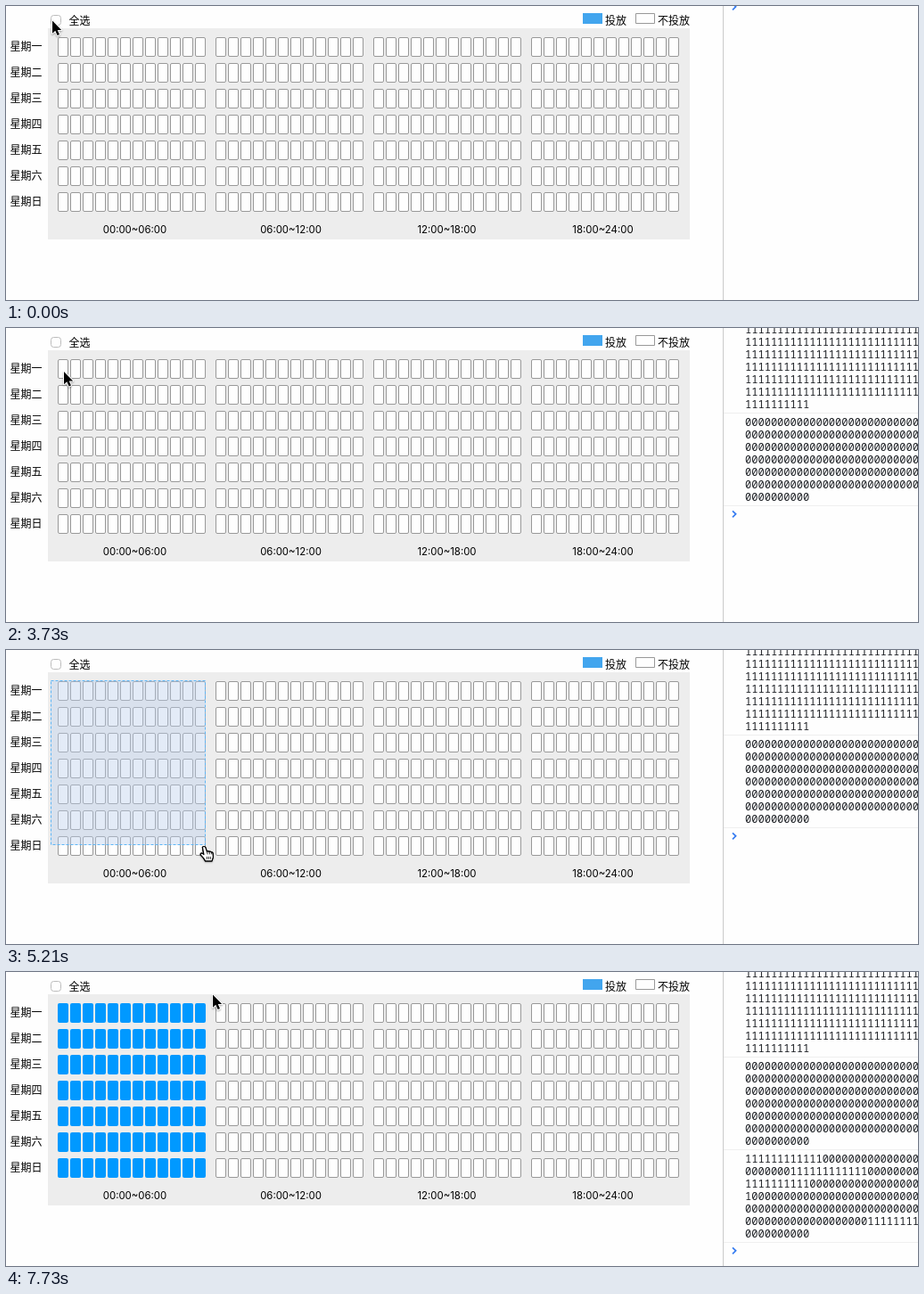
Write an HTML page with a canvas that moves like this. It is 1023 by 330 pixels and loops after 8 s.

```html
<!DOCTYPE html>
<html lang="zh-CN">
<head>
<meta charset="utf-8">
<title>时段选择</title>
<style>
html, body { margin: 0; width: 100%; height: 100%; overflow: hidden; background: #fefefe; }
#stage { position: relative; width: 1023px; height: 330px; max-width: 100%; max-height: 100%; overflow: clip; contain: paint; }
canvas { position: absolute; left: 0; top: 0; }
span, pre { position: absolute; margin: 0; white-space: pre; }
span { font: 12px/14px "Noto Sans CJK SC", "Noto Sans CJK", sans-serif; color: #000; }
.hours { font: 11.4px/14px Inter, sans-serif; transform: translateX(-50%); }
pre { font: 12.04px/14px "Noto Sans Mono", "DejaVu Sans Mono", monospace; color: #1c1f24; }
</style>
</head>
<body>
<div id="stage"><canvas width="1023" height="330"></canvas></div>
<script>
const LOOP = 8000;
const stage = document.getElementById('stage');
const ctx = stage.querySelector('canvas').getContext('2d');
const BLUE = '#0099ff';

function addText(tag, text, x, y, cls = '') {
  const el = document.createElement(tag);
  el.textContent = text;
  el.className = cls;
  el.style.left = x + 'px';
  el.style.top = y + 'px';
  stage.append(el);
  return el;
}

// The first console line is shorter than the rest.
function wrap(bits) {
  const lines = [bits.slice(0, 41)];
  for (let i = 41; i < bits.length; i += 57) lines.push(bits.slice(i, i + 57));
  return lines.join('\n');
}

[...'一二三四五六日'].forEach((d, i) => addText('span', '星期' + d, 4.5, 38 + i * 29));
addText('span', '全选', 70.5, 9);
addText('span', '投放', 672, 9);
addText('span', '不投放', 731, 9);
['00:00~06:00', '06:00~12:00', '12:00~18:00', '18:00~24:00']
  .forEach((s, i) => addText('span', s, 144.5 + i * 175, 244, 'hours'));

const logs = [
  { at: 890, bits: '1'.repeat(336) },
  { at: 1940, bits: '0'.repeat(336) },
  { at: 6100, bits: ('1'.repeat(12) + '0'.repeat(36)).repeat(7) }
];
logs.forEach((log, i) => log.el = addText('pre', wrap(log.bits), 829, -5 + i * 104));

const lerp = (a, b, p) => a + (b - a) * p;
const smooth = p => p * p * (3 - 2 * p);

// Cursor moves: start, last change, number of changes, position by step index.
const moves = [
  { from: 150, to: 450, n: 3, at: i => [lerp(52, 53, (i + 1) / 3), lerp(16.5, 14, (i + 1) / 3)] },
  { from: 2990, to: 3290, n: 3, at: i => [lerp(53, 49, (i + 1) / 3), lerp(14, 34, smooth((i + 1) / 3))] },
  { from: 3730, to: 4770, n: 8, at: i => [lerp(65, 216, smooth(i / 7)), lerp(49, 198.5, smooth(i / 7))] },
  { from: 4920, to: 5800, n: 7, at: i => {
    const p = 1 - (1 - (i + 1) / 7) ** 2;
    return [lerp(216, 225.5, p), lerp(198.5, 231, p)];
  } },
  { from: 6400, to: 7430, n: 8, at: i => {
    const p = (i + 1) / 8;
    return [lerp(225.5, 232, p) + 4 * Math.sin(Math.PI * p), lerp(231, 38, smooth(p))];
  } },
  { from: 7580, to: 7730, n: 2, at: i => [232, lerp(38, 25.5, (i + 1) / 2)] }
];

function stepOf(m, t) {
  const gap = (m.to - m.from) / (m.n - 1);
  return Math.min(m.n - 1, Math.floor((t - m.from + 5) / gap));
}

function cursorAt(t) {
  let pos = [52, 16.5];
  for (const m of moves) if (t >= m.from) pos = m.at(stepOf(m, t));
  return pos;
}

// The dragged corner trails the pointer, then settles just past it.
function cornerAt(t) {
  if (t < 3880 || t >= 6100) return null;
  const [x, y] = cursorAt(t);
  if (t < 4920) return [x, y - 4];
  const p = (stepOf(moves[3], t) + 1) / 7;
  return [x + 3.5 * p, y + lerp(-4, 3, p)];
}

function box(x, y, w, h, r, fill, line) {
  ctx.beginPath();
  if (line) ctx.roundRect(x + .5, y + .5, w - 1, h - 1, r);
  else ctx.roundRect(x, y, w, h, r);
  ctx.fillStyle = fill;
  ctx.fill();
  if (line) {
    ctx.lineWidth = 1;
    ctx.strokeStyle = line;
    ctx.stroke();
  }
}

function polyline(points, color, width) {
  ctx.beginPath();
  points.forEach(([x, y]) => ctx.lineTo(x, y));
  ctx.strokeStyle = color;
  ctx.lineWidth = width;
  ctx.stroke();
}

function drawGrid(t) {
  box(47, 25, 720, 237, 0, '#ededed');
  const all = t >= 890 && t < 1940;
  for (let row = 0; row < 7; row++) {
    for (let col = 0; col < 48; col++) {
      const group = Math.floor(col / 12);
      const x = 58 + group * 177 + (col % 12) * 14, y = 35 + row * 29;
      if (all || (t >= 6100 && group === 0)) box(x, y, 12, 22, 2, BLUE);
      else box(x, y, 12, 22, 1.5, '#fefefe', '#999');
    }
  }
}

function drawHeader(t) {
  box(647, 8, 22, 12, 0, '#42a5ee');
  box(706, 8, 22, 12, 0, '#fefefe', '#999');
  if (t >= 890 && t < 1940) {
    box(50, 10, 12, 12, 3, '#3b8ef6');
    polyline([[53, 16], [55.3, 18.8], [59, 13]], '#fff', 1.6);
  } else {
    box(50, 10, 12, 12, 3, '#fefefe', '#bcbcbc');
  }
}

function drawConsole(t) {
  box(804, 0, 1, 330, 0, '#cbcbcb');
  let count = 0;
  logs.forEach((log, i) => {
    const on = t >= log.at;
    log.el.style.visibility = on ? 'visible' : 'hidden';
    if (!on) return;
    count++;
    box(805, 95 + i * 104, 218, 1, 0, '#efefef');
  });
  const y = .8 + count * 104;
  polyline([[815, y - 3.5], [818.6, y], [815, y + 3.5]], '#367cf1', 1.7);
}

function drawSelection(corner) {
  const w = Math.round(corner[0]) - 50, h = Math.round(corner[1]) - 34;
  ctx.fillStyle = 'rgba(185,205,235,.4)';
  ctx.fillRect(50, 34, w, h);
  ctx.setLineDash([3, 2]);
  ctx.lineWidth = 1;
  ctx.strokeStyle = '#5db6f6';
  ctx.strokeRect(50.5, 34.5, w - 1, h - 1);
  ctx.setLineDash([]);
}

const arrow = new Path2D('M0 0V14.2L3.3 11.2L5.6 16.6L8 15.6L5.7 10.4H10.2Z');
const hand = new Path2D('M-2 1Q0 -1 1.5 1.5L3 6Q4.5 4.8 5.6 6.2Q7 5.2 8 6.8Q9.5 6.2 9.7 8.2L10 12L8.6 16.5H1.2L-1 13L-4.2 9.5Q-4.3 7.2 -2 8L-.5 9.2Z');
const knuckles = new Path2D('M3 6L3.8 9M5.6 6.4L6.2 9M8 7L8.4 9M3 11.5V14.5M5 11.5V14.5M7 11.5V14.5');

function drawCursor([x, y], isHand) {
  ctx.save();
  ctx.translate(x, y);
  ctx.lineJoin = 'round';
  ctx.shadowColor = 'rgba(0,0,0,.35)';
  ctx.shadowBlur = 2;
  ctx.shadowOffsetY = 1;
  ctx.lineWidth = isHand ? 1.2 : 2;
  ctx.strokeStyle = isHand ? '#000' : '#fff';
  ctx.fillStyle = isHand ? '#fff' : '#000';
  const shape = isHand ? hand : arrow;
  ctx.stroke(shape);
  ctx.shadowColor = 'transparent';
  ctx.fill(shape);
  if (isHand) {
    ctx.stroke(shape);
    ctx.lineWidth = .8;
    ctx.stroke(knuckles);
  }
  ctx.restore();
}

function draw(t) {
  ctx.fillStyle = '#fefefe';
  ctx.fillRect(0, 0, 1023, 330);
  drawGrid(t);
  drawHeader(t);
  drawConsole(t);
  const corner = cornerAt(t);
  if (corner) drawSelection(corner);
  drawCursor(cursorAt(t), t >= 4170 && t < 5350);
}

const start = performance.now();
function tick() {
  draw((performance.now() - start) % LOOP);
  requestAnimationFrame(tick);
}
draw(0);
requestAnimationFrame(tick);
</script>
</body>
</html>
```
